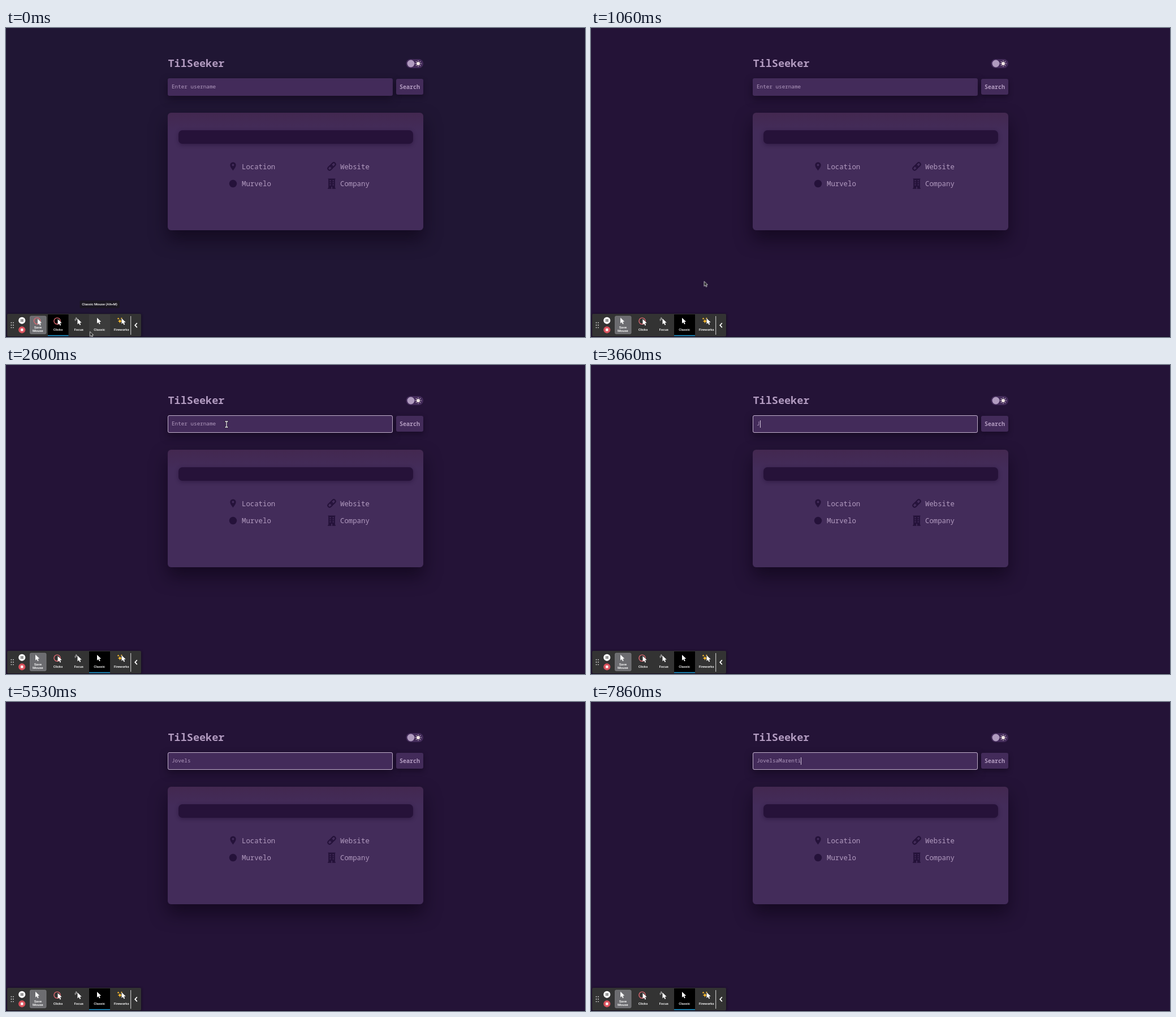
Write an HTML page that moves like this. It is 1024 px wide and 547 px high and loops after 8000 ms.

```html
<!DOCTYPE html>
<html lang="en">
<head>
<meta charset="utf-8">
<title>Profile search</title>
<style>
  :root { --panel: #432b5a; --ink: #25123a; --text: #b29bc0; --loop: 8s step-end infinite; }
  html, body { margin: 0; width: 100%; height: 100%; overflow: hidden; }
  body { position: relative; background: #241337; animation: page var(--loop); }
  div, svg { position: absolute; box-sizing: border-box; }
  svg { left: 0; top: 0; width: 1024px; height: 547px; }
  .mono, .field { font-family: "Noto Sans Mono", "DejaVu Sans Mono", monospace; fill: var(--text); color: var(--text); }
  .item { font-size: 12.35px; }
  .ui { font: 500 6.15px Roboto, Arial, sans-serif; fill: #fff; text-anchor: middle; }

  .field { left: 286px; top: 89px; width: 398px; height: 31px; border-radius: 3px; background: var(--panel);
    box-shadow: 0 6px 14px rgba(12, 4, 20, .5); font-size: 9.3px; font-weight: 500; line-height: 30px; white-space: pre; }
  .ring { inset: 0; border: 1px solid #c3b2cd; border-radius: 3px; opacity: 0; animation: focus var(--loop); }
  .hint, .typed { left: 7px; top: 0; }
  .hint { animation: hint var(--loop); }
  .typed { height: 30px; width: 0; animation: type var(--loop); }
  .typed span { display: block; width: 100%; overflow: hidden; }
  .caret { left: 100%; top: 9px; width: 1px; height: 13px; background: #d5c7dd; opacity: 0; animation: caret var(--loop); }

  .button { left: 690px; top: 90px; width: 48px; height: 28px; border-radius: 3px; background: var(--panel);
    box-shadow: 0 4px 10px rgba(12, 4, 20, .45); }
  .card { left: 286px; top: 150px; width: 452px; height: 208px; border-radius: 6px;
    background: linear-gradient(#432850, #432c5a 16%); box-shadow: 0 16px 30px rgba(12, 4, 20, .6); }
  .bio { left: 18.5px; top: 30.5px; width: 415px; height: 24.5px; border-radius: 7px; background: #261239;
    box-shadow: 0 2px 7px rgba(25, 8, 40, .4); }

  .bar { left: 2px; top: 506px; width: 237px; height: 39.5px; background: #333; border-radius: 2px; box-shadow: 0 1px 4px rgba(0, 0, 0, .6); }
  .tip { animation: before var(--loop); }
  .before { animation: before-pick var(--loop); }
  .after { opacity: 0; animation: after-pick var(--loop); }
  .tab { opacity: 0; animation: tab 8s linear infinite; }

  .mouse { transform: translate(390px, 105px); animation: move 8s infinite; }
  .mouse g { opacity: 0; }
  .mouse .arrow { animation: arrow var(--loop); }
  .mouse .hand { animation: hand var(--loop); }
  .mouse .beam { animation: beam var(--loop); }

  @keyframes page { 0% { background: #201634; } 4.1%, 100% { background: #241337; } }
  @keyframes focus { 0% { opacity: 0; } 23.2%, 100% { opacity: 1; } }
  @keyframes hint { 0% { opacity: 1; } 45.7%, 100% { opacity: 0; } }
  @keyframes type {
    0% { width: 0; } 45.7% { width: 1ch; } 46.57% { width: 2ch; } 47.44% { width: 3ch; }
    48.2% { width: 4ch; } 49.07% { width: 6ch; } 84.95% { width: 8ch; } 88.2% { width: 10ch; }
    89.07% { width: 11ch; } 89.95% { width: 12ch; } 90.7% { width: 13ch; } 98.2%, 100% { width: 14ch; }
  }
  @keyframes caret {
    0%, 30.7%, 54.95%, 69.07%, 81.57%, 96.57% { opacity: 0; }
    23.2%, 38.2%, 61.57%, 75.7%, 84.95%, 98.2%, 100% { opacity: 1; }
  }
  @keyframes before { 0% { opacity: 1; } 4.9%, 100% { opacity: 0; } }
  @keyframes before-pick { 0% { opacity: 1; } 4.1%, 100% { opacity: 0; } }
  @keyframes after-pick { 0% { opacity: 0; } 4.1%, 100% { opacity: 1; } }
  @keyframes tab { 0%, 4.1% { opacity: 0; } 5.6% { opacity: .9; } 7%, 100% { opacity: 1; } }
  @keyframes move {
    0%, .7% { transform: translate(148.5px, 537.5px); }
    3%, 11% { transform: translate(151px, 537.5px); animation-timing-function: ease-in-out; }
    18.2%, 100% { transform: translate(390px, 105px); }
  }
  @keyframes arrow { 0%, 13.2% { opacity: 1; } 3.2%, 17.2%, 100% { opacity: 0; } }
  @keyframes hand { 0%, 13.2%, 100% { opacity: 0; } 3.2% { opacity: 1; } }
  @keyframes beam { 0%, 45.7%, 100% { opacity: 0; } 17.2% { opacity: 1; } }
</style>
</head>
<body>
<div class="field">
  <div class="ring"></div>
  <div class="hint">Enter username</div>
  <div class="typed"><span>JovelsaMarenti</span><div class="caret"></div></div>
</div>
<div class="button"></div>
<div class="card"><div class="bio"></div></div>
<div class="bar"></div>

<svg viewBox="0 0 1024 547">
  <defs>
    <path id="pointer" d="M0 0V10L2.4 7.9 4 11.5 5.7 10.7 4.1 7.3 7.2 7Z"/>
    <g id="click"><circle r="5.6" fill="none" stroke="#df6870" stroke-width="1.4"/><use href="#pointer" x="1" y="-3.5" fill="#fff"/></g>
    <path id="spark" d="M0-4Q.6-.6 4 0Q.6.6 0 4Q-.6.6-4 0Q-.6-.6 0-4Z" fill="#f5b82e"/>
  </defs>

  <g class="mono">
    <text x="286.5" y="69.3" font-size="18.5" font-weight="600">TilSeeker</text>
    <text x="696" y="107.8" font-size="10" font-weight="600">Search</text>
    <text class="item" x="417" y="249.5">Location</text>
    <text class="item" x="417" y="280">Murvelo</text>
    <text class="item" x="591" y="249.5">Website</text>
    <text class="item" x="591" y="280">Company</text>
  </g>

  <rect x="707.5" y="55" width="30.5" height="16" rx="8" fill="#432b5a"/>
  <circle cx="716" cy="63" r="6.4" fill="#b09bbf"/>
  <g transform="translate(729 63)" stroke="#f1e6e4" stroke-width="1.1">
    <circle r="2.5" fill="#f1e6e4"/>
    <path d="M0-5.6V-4M0 5.6V4M-5.6 0H-4M5.6 0H4M-3.9-3.9-2.9-2.9M3.9 3.9 2.9 2.9M-3.9 3.9-2.9 2.9M3.9-3.9 2.9-2.9"/>
  </g>

  <g fill="#25123a">
    <path fill-rule="evenodd" d="M401.5 252.5C399.6 249.8 396.3 246 396.3 242.6A5.2 5.2 0 0 1 406.7 242.6C406.7 246 403.4 249.8 401.5 252.5ZM401.5 240.6a2 2 0 1 0 .01 0Z"/>
    <circle cx="401.5" cy="275.5" r="6.7"/>
    <g transform="translate(576 245) rotate(-45)" fill="none" stroke="#25123a" stroke-width="2.1">
      <rect x="-8.2" y="-3" width="9.6" height="6" rx="3"/>
      <rect x="-1.4" y="-3" width="9.6" height="6" rx="3"/>
    </g>
    <path d="M570 266.5h12.4v1.4h-.5v15.2h.9v1.6H569.2v-1.6h1v-15.2h-.5v-1.4Z"/>
    <path stroke="#432c5a" stroke-width="1.7" d="M572.3 270.3h2.5M577.5 270.3h2.5M572.3 274h2.5M577.5 274h2.5M572.3 277.7h2.5M577.5 277.7h2.5M576.1 281v3.7"/>
  </g>

  <path d="M0 546.5H1024" stroke="#12081d" opacity=".6"/>

  <g class="before">
    <rect x="74" y="507" width="36.5" height="38.5"/>
    <path d="M74 544.5h36.5" stroke="#1da4e4" stroke-width="1.7"/>
    <rect x="147" y="507" width="37" height="38.5" fill="#3c3c3c"/>
  </g>
  <g class="tab">
    <rect x="147" y="507" width="37" height="38.5"/>
    <path d="M147 544.5h37" stroke="#1da4e4" stroke-width="1.7"/>
  </g>
  <rect x="42.5" y="510" width="28.5" height="31.5" rx="2" fill="#6c6c70" stroke="#808084" stroke-width=".8"/>
  <path d="M9.4 521.7v.01M9.4 526v.01M9.4 530.3v.01M12.9 521.7v.01M12.9 526v.01M12.9 530.3v.01" stroke="#ddd" stroke-width="1.8" stroke-linecap="round"/>
  <circle cx="28.2" cy="517.8" r="6.1" fill="#fff"/>
  <path d="M26.9 515.3v5M29.6 515.3v5" stroke="#333" stroke-width="1.3"/>
  <circle cx="28.2" cy="534.3" r="6.1" fill="#d9525d"/>
  <rect x="26" y="532.1" width="4.4" height="4.4" rx=".5" fill="#fff"/>
  <path d="M220.7 510v33" stroke="#ddd"/>
  <path d="M231.8 522.3 228.2 526.2 231.8 530.1" fill="none" stroke="#fff" stroke-width="1.7"/>

  <use class="before" href="#click" x="55" y="518.5"/>
  <use class="after" href="#pointer" x="52" y="512.7" fill="#fff"/>
  <use href="#click" x="90.5" y="518.7"/>
  <g stroke="#a5a5a5" stroke-width="1.1" stroke-linecap="round">
    <path d="M121.8 516.2 125 513.2M122.2 518 124.5 515.8M123.8 512.6 126.3 516.3" fill="none"/>
  </g>
  <use href="#pointer" x="126.5" y="514.5" fill="#fff"/>
  <use href="#pointer" x="161" y="513" fill="#fff"/>
  <use href="#spark" x="201.5" y="519"/>
  <use href="#spark" transform="translate(198.6 514.5) scale(.5)"/>
  <use href="#spark" transform="translate(204.3 514) scale(.45)"/>
  <use href="#pointer" x="204.5" y="514" fill="#fff"/>
  <g class="ui">
    <text x="56.3" y="532.2">Save</text>
    <text x="56.3" y="538.2">Mouse</text>
    <text x="92" y="535.8">Clicks</text>
    <text x="128.7" y="535.8">Focus</text>
    <text x="165.3" y="535.8">Classic</text>
    <text x="204.2" y="535.8">Fireworks</text>
    <g class="tip">
      <rect x="130.5" y="482.5" width="70.5" height="13.5" rx="2" fill="#1b1722"/>
      <text x="165.7" y="491.2">Classic Mouse (Alt+M)</text>
    </g>
  </g>

  <g class="mouse">
    <g class="arrow"><use href="#pointer" transform="scale(.85)" fill="#222" stroke="#fff" stroke-width=".9"/></g>
    <g class="hand">
      <path d="M-1 0Q0-1 1 0V3.2L3.8 3.9Q4.7 4.3 4.5 5.4L3.8 9H-1.2L-3.6 5.4Q-3.5 4-2.2 4.5L-1 5.6Z" fill="#fff" stroke="#222" stroke-width=".6"/>
    </g>
    <g class="beam" fill="none">
      <path id="ibeam" d="M-2.7-5H2.7M0-5V5M-2.7 5H2.7" stroke="#1c1026" stroke-width="2.6" stroke-linecap="square"/>
      <path d="M-2.7-5H2.7M0-5V5M-2.7 5H2.7" stroke="#eee" stroke-width="1.3"/>
    </g>
  </g>
</svg>
</body>
</html>
```
